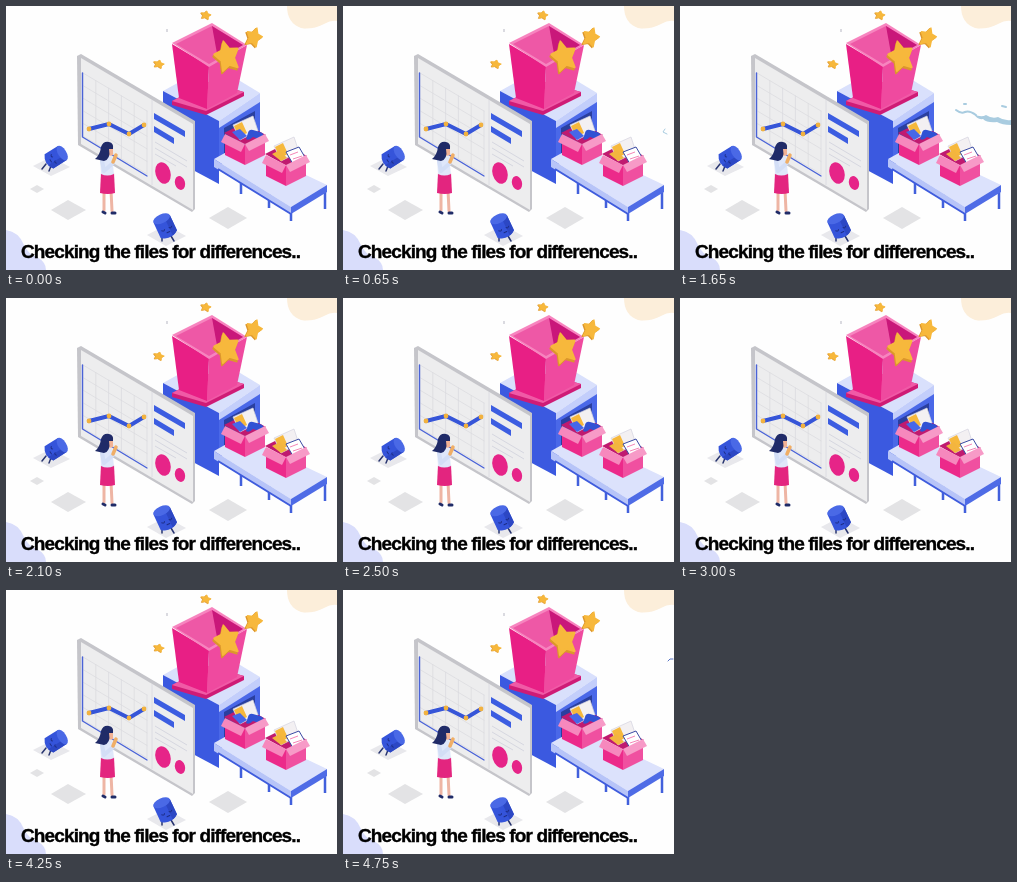
Animation, 331 px wide and 264 px high, one loop 4800 ms. Source, as an HTML page:

```html
<!DOCTYPE html>
<html lang="en">
<head>
<meta charset="utf-8">
<style>
html, body { margin: 0; width: 100%; height: 100%; overflow: hidden; background: #fefefe; }
svg { display: block; width: 331px; height: 264px; }
text { font: bold 19px "Liberation Sans", Arial, sans-serif; letter-spacing: -.87px; stroke: #000; stroke-width: .35; }
.line { fill: none; stroke-linecap: round; stroke-linejoin: round; }
</style>
</head>
<body>
<svg viewBox="0 0 331 264">
<defs>
  <path id="point" d="M0-10 3.4-4.2 10-3 5.4 2.2 6.4 9 0 6-6.4 9-5.4 2.2-10-3-3.4-4.2Z" stroke-linejoin="round" stroke-width="1.5"/>
  <g id="star">
    <use href="#point" x="-1.2" y="1.2" fill="#dc962c" stroke="#dc962c"/>
    <use href="#point" fill="#f7b83c" stroke="#f7b83c"/>
  </g>
  <g id="can">
    <path d="M-9-8V9Q0 16 9 9V-8Z" fill="#3554da"/>
    <path d="M3-8V12Q7 11 9 9V-8Z" fill="#2c47c4"/>
    <ellipse cy="-8" rx="9" ry="4.5" fill="#4a69e6"/>
    <path class="line" d="M-5 3q2 2 3 0M3 3q1 2 3 0M-1 7h3" stroke="#1d2d86"/>
  </g>
  <g id="crate">
    <path d="M-20-14 0-24 22-12 2-2Z" fill="#c01a70"/>
    <path d="M-11-22 9-31 14-16-4-7Z" fill="#f3f0f2" stroke="#d5d3e0" stroke-width=".7"/>
    <path d="M-10-21-2-25 3-14-5-10Z" fill="#f6b83c"/>
  </g>
  <g id="crateFront">
    <path d="M-19-12 1-2V18L-19 8Z" fill="#ec2a8a"/>
    <path d="M1-2 21-12V8L1 18Z" fill="#f050a0"/>
    <path d="M-19-13 1-3-3 5-23-5Z" fill="#f688bd"/>
    <path d="M1-3 21-13 25-6 5 4Z" fill="#f79ac7"/>
  </g>
</defs>

<path d="M281 0Q281 17 295 22 306 24 318 18 325 14 331 15V0Z" fill="#fceeda"/>
<path d="M0 224Q13 226 18 239 22 248 31 251 40 256 40 264H0Z" fill="#d9ddfb"/>

<g fill="#e3e3e5">
  <path d="M45 204 62 194 80 204 62 214Z"/>
  <path d="M24 183 31 179 38 183 31 187Z"/>
  <path d="M203 212 222 201 241 212 222 223Z"/>
</g>

<g id="machine">
  <path d="M213 116 254 93V138L213 160Z" fill="#4a68e8"/>
  <path d="M218 122 249 105V138L218 155Z" fill="#2a3f9f"/>
  <path d="M157 85 206 58 254 87 213 115Z" fill="#d9e0fc"/>
  <path d="M157 85 213 115V178L157 148Z" fill="#3b59e0"/>
  <path d="M213 115 254 87V96L213 122Z" fill="#c3cefb"/>
</g>

<g id="belt">
  <path d="M235 172V188M263 188V202M285 202V215M319 182V203" stroke="#4260dc" stroke-width="2.5"/>
  <path d="M208 153 235 138 321 179 285 201Z" fill="#dce2fc"/>
  <path d="M208 153 285 201V208L208 161Z" fill="#b7c4f8"/>
  <path d="M285 201 321 179V186L285 208Z" fill="#4f6ce6"/>
  <path d="M212 163 285 208" stroke="#3f5cdd" stroke-width="2"/>
</g>

<g id="crates">
  <g transform="translate(238 141)">
    <use href="#crate"/>
    <path d="M4-14Q5-18 9-17L16-15Q21-14 20-6 17-4 15-8L9-10Q5-6 2-8Z" fill="#3152d4"/>
    <path d="M-12-15-4-18 3-11-4-7Z" fill="#4667e9"/>
    <use href="#crateFront"/>
  </g>
  <g transform="translate(279 162)">
    <use href="#crate"/>
    <path d="M1-16 14-21 21-9 8-4Z" fill="#fff" stroke="#3b4ba4"/>
    <path d="M5-13 13-16M8-9 17-12" stroke="#f486b7"/>
    <path d="M-13-14-5-18 2-10-4-7Z" fill="#f3b53f"/>
    <use href="#crateFront"/>
  </g>
</g>

<g id="bin">
  <path d="M166 95 203 76 238 86V90L200 109 166 99Z" fill="#cf1b76"/>
  <path d="M166 95 203 76 238 86 200 105Z" fill="#f05aa6"/>
  <path d="M166 38 203 60 201 103 173 92Z" fill="#e81f85"/>
  <path d="M203 60 241 39 231 87 201 103Z" fill="#ef4a9f"/>
  <path d="M166 37 206 17 241 39 203 61Z" fill="#f784bf"/>
  <path d="M170 38 206 20 237 39 203 58Z" fill="#ee58a6"/>
  <path d="M206 20 237 39 212 53Z" fill="#c9177a"/>
</g>

<use href="#star" transform="translate(200 9) rotate(12) scale(.5 .42)"/>
<use href="#star" transform="translate(248 31) rotate(18) scale(.8 .95)"/>
<use href="#star" transform="translate(221 50) rotate(-14) scale(1.2 1.5)"/>
<use href="#star" transform="translate(153 58) rotate(14) scale(.52 .4)"/>
<path d="M161 23v3" stroke="#99a" stroke-width=".7"/>

<g id="board">
  <path d="M71 50 75 48 189 115V203L186 206 72 139Z" fill="#c5c5ca"/>
  <path d="M75 52 187 118V204L75 138Z" fill="#ededee"/>
  <path id="grid" class="line" stroke="#dadade" stroke-width=".7"/>
  <path class="line" d="M76.5 67V131L141 170" stroke="#4a63d8" stroke-width="1.4"/>
  <path d="M146 94V179" stroke="#dcdce2"/>
  <path id="curve" class="line" stroke="#3655d8" stroke-width="4"/>
  <g id="dots" fill="#f2b23f"></g>
  <path d="M148 107 179 125V131L148 113ZM148 120 168 132V138L148 126Z" fill="#3c5de1"/>
  <path d="M149 136 181 155M149 142 181 161M149 148 170 160" stroke="#d6d7e0"/>
  <g fill="#e62488">
    <ellipse cx="157" cy="167" rx="7.5" ry="11" transform="rotate(-16 157 167)"/>
    <ellipse cx="174" cy="177" rx="5" ry="7" transform="rotate(-16 174 177)"/>
  </g>
</g>

<g id="cans">
  <path d="M27 160 45 151 64 161 45 170Z" fill="#e8e8ec"/>
  <path class="line" d="M40 158 36 163M45 160 43 165" stroke="#27346f" stroke-width="1.5"/>
  <use href="#can" transform="translate(50 151) rotate(58) scale(.92)"/>
  <path d="M141 229 160 219 180 230 160 240Z" fill="#e8e8ec"/>
  <path class="line" d="M156 230V235M165 230 168 235" stroke="#27346f" stroke-width="1.5"/>
  <use href="#can" transform="translate(159 220) rotate(-25)"/>
</g>

<g id="woman">
  <path class="line" d="M98 184V204M105 184 106 205" stroke="#eeb5a4" stroke-width="3"/>
  <path class="line" d="M97 206 99 207M106 207 109 207" stroke="#202c68" stroke-width="3"/>
  <path d="M95 167H108L109 187Q102 189 94 187Z" fill="#e3257f"/>
  <path d="M94 152Q99 147 106 151L108 168Q101 171 95 168Z" fill="#dfe7fa"/>
  <path class="line" d="M96 155 98 165 107 157" stroke="#d3def6" stroke-width="4"/>
  <path class="line" d="M107 156 110 149" stroke="#f0ae66" stroke-width="3.5"/>
  <path d="M101 139H107V149Q103 151 100 148Z" fill="#f2b294"/>
  <path d="M95 141Q97 135 103 136 108 137 107 143L103 143Q105 153 98 155L89 153Q94 149 95 141Z" fill="#202b68"/>
</g>

<text x="15" y="252">Checking the files for differences..</text>

<g id="streaks" class="line" stroke="#a9cce0">
  <path d="M276 104Q281 108 285 106T296 109M284 98 286 98M322 100 326 101" stroke-width="2"/>
  <path d="M322 123 320 126 324 128"/>
  <path d="M317 109 320 111 324 111M326 73 329 71M309 87 311 87"/>
  <path d="M325 71 327 69 330 69" stroke="#5874c5"/>
</g>
<path id="ribbon" fill="#a9cce0" d="M294 108Q301 112 306 109 312 113 318 111 324 115 331 114V119Q322 119 317 116 307 117 303 113 297 114 294 108Z"/>
</svg>
<script>
const LOOP = 4800;
const find = id => document.getElementById(id);

// Grid lines follow the slope of the board.
const slope = .594;
let grid = "";
for (let i = 0; i < 6; i++) {
  const x = 77 + i * 12.8, y = 67 + i * 12.6;
  grid += `M${x} ${67 + (x - 77) * slope}v63M77 ${y}l64 ${64 * slope}`;
}
find("grid").setAttribute("d", grid);

const points = [[83, 123], [103, 118], [123, 128], [138, 119]];
find("curve").setAttribute("d", "M" + points.join(" "));
find("dots").innerHTML = points
  .map(([x, y]) => `<circle cx="${x}" cy="${y}" r="2.4"/>`).join("");

const [wave, hook, specks, dash] = find("streaks").children;
const visible = [
  [wave, 1450, 1900], [find("ribbon"), 1450, 1900],
  [hook, 500, 850], [specks, 3350, 3850], [dash, 4600, 4800],
];

function draw(now) {
  const t = now % LOOP;
  for (const [mark, start, end] of visible) {
    mark.style.display = t >= start && t < end ? "" : "none";
  }
  requestAnimationFrame(draw);
}
draw(performance.now());
</script>
</body>
</html>
```
